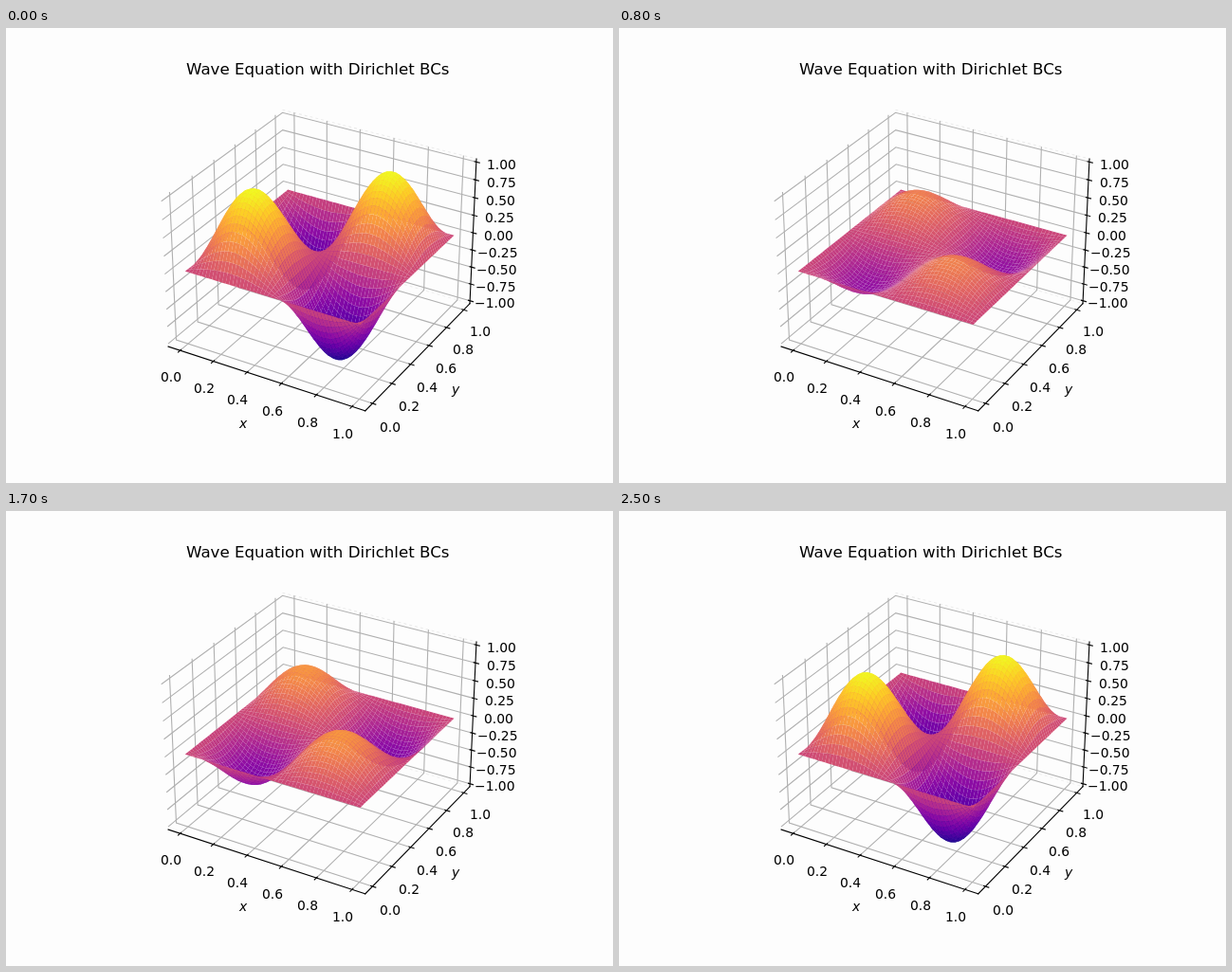
These frames come from a looping animation (640x480 px, 2.6 s). An HTML page with a canvas:

```html
<!DOCTYPE html>
<html lang="en">
<head>
<meta charset="utf-8">
<title>Wave Equation with Dirichlet BCs</title>
<style>
  html, body { margin: 0; width: 100%; height: 100%; overflow: hidden; background: #fdfdfd; }
  canvas { display: block; }
</style>
</head>
<body>
<canvas id="stage" width="640" height="480"></canvas>
<script>
const ctx = document.getElementById('stage').getContext('2d');

const STEP_MS = 100, STEPS = 26, PERIOD = 25.6;
const CELLS = 50;
const FONT = '"DejaVu Sans", Verdana, sans-serif';
const PLASMA = ['0d0887', '41049d', '6a00a8', '8f0da4', 'b12a90', 'cc4778',
  'e16462', 'f2844b', 'fca636', 'fcce25', 'f0f921']
  .map(h => [0, 2, 4].map(i => parseInt(h.slice(i, i + 2), 16)));

// Axes box in centred world units: 4:4:3 aspect with a small margin.
const BOX = 8 / 7, BOX_Z = 6 / 7;
const SIDE = BOX / 2 * 25 / 24, TALL = BOX_Z / 2 * 25 / 24;
const DELTA = BOX / 12, DELTA_Z = BOX_Z / 12;
const wx = v => (v - 0.5) * BOX / 1.1;
const wz = v => v * BOX_Z / 2;

// Perspective camera: elevation 30, azimuth -60, distance 10.
const ELEV = Math.PI / 6, AZIM = -Math.PI / 3, DIST = 10;
const [se, ce, sa, ca] = [Math.sin(ELEV), Math.cos(ELEV), Math.sin(AZIM), Math.cos(AZIM)];
const ZOOM = 369.6 / 0.185;

function project(x, y, z) {
  const near = ce * ca * x + ce * sa * y + se * z;
  const k = ZOOM / (DIST - near);
  return [
    332.995 + k * (-sa * x + ca * y),
    237.405 - k * (-se * ca * x - se * sa * y + ce * z),
    near
  ];
}

function trace(points) {
  ctx.beginPath();
  for (const p of points) ctx.lineTo(p[0], p[1]);
}

function line(color, ...points) {
  trace(points.map(p => project(...p)));
  ctx.strokeStyle = color;
  ctx.lineWidth = 1.111;
  ctx.stroke();
}

// Centres the inked width on x, with y as the baseline.
function text(str, x, y, size = 13.889, style = '') {
  ctx.font = `${style} ${size}px ${FONT}`;
  ctx.fillStyle = '#000';
  const m = ctx.measureText(str);
  const half = (m.actualBoundingBoxRight - m.actualBoundingBoxLeft) / 2;
  ctx.fillText(str, Math.ceil(x - half), y);
}

function tickLabel(str, pos) {
  const [x, y] = project(...pos);
  text(str, x, Math.round(y + 11));
}

function plasma(v) {
  const s = Math.min(1, Math.max(0, v)) * (PLASMA.length - 1);
  const i = Math.min(PLASMA.length - 2, Math.floor(s));
  const rgb = PLASMA[i].map((c, k) => Math.round(c + (PLASMA[i + 1][k] - c) * (s - i)));
  return `rgb(${rgb})`;
}

const flatTicks = [0, 0.2, 0.4, 0.6, 0.8, 1];
const zTicks = Array.from({ length: 9 }, (_, i) => 1 - i / 4);

function drawAxes() {
  const grid = '#b0b0b0', out = 0.2 * DELTA, inn = 0.1 * DELTA;
  const pad = 1.0372 * DELTA, padZ = 1.0372 * DELTA_Z;

  ctx.lineCap = 'butt';
  ctx.setLineDash([3, 3]);
  line('#ececec', [-SIDE, SIDE, TALL], [SIDE, SIDE, TALL]);
  line('#f0f0f0', [-SIDE, SIDE, -TALL], [SIDE, SIDE, -TALL]);
  ctx.setLineDash([]);

  for (const v of flatTicks) {
    const t = wx(v);
    line(grid, [t, -SIDE, -TALL], [t, SIDE, -TALL], [t, SIDE, TALL]);
    line(grid, [SIDE, t, -TALL], [-SIDE, t, -TALL], [-SIDE, t, TALL]);
  }
  for (const v of zTicks) {
    const t = wz(v);
    line(grid, [-SIDE, -SIDE, t], [-SIDE, SIDE, t], [SIDE, SIDE, t]);
  }

  ctx.lineCap = 'square';
  line('#000', [-SIDE, -SIDE, -TALL], [SIDE, -SIDE, -TALL]);
  line('#000', [SIDE, -SIDE, -TALL], [SIDE, SIDE, -TALL]);
  line('#000', [SIDE, SIDE, -TALL], [SIDE, SIDE, TALL]);

  for (const v of flatTicks) {
    const t = wx(v), name = v.toFixed(1);
    line('#000', [t, -SIDE - out, -TALL], [t, -SIDE + inn, -TALL]);
    line('#000', [SIDE + out, t, -TALL], [SIDE - inn, t, -TALL]);
    tickLabel(name, [t, -SIDE - pad, -TALL - padZ]);
    tickLabel(name, [SIDE + pad, t, -TALL - padZ]);
  }
  for (const v of zTicks) {
    const t = wz(v);
    line('#000', [SIDE + out, SIDE, t], [SIDE - inn, SIDE, t]);
    tickLabel(v.toFixed(2).replace('-', '\u2212'), [SIDE + pad, SIDE + pad, t]);
  }

  text('x', 249.6, 422, 13.889, 'italic');
  text('y', 473.8, 386, 13.889, 'italic');
  text('Wave Equation with Dirichlet BCs', 328, 49, 16.667);
}

function drawSurface(amp) {
  const wave = Array.from({ length: CELLS + 1 }, (_, i) => Math.sin(2 * Math.PI * i / CELLS));
  const nodes = wave.map((a, i) => wave.map((b, j) => {
    const u = amp * a * b;
    return [...project(wx(i / CELLS), wx(j / CELLS), wz(u)), u];
  }));

  const faces = [];
  for (let i = 0; i < CELLS; i++) {
    for (let j = 0; j < CELLS; j++) {
      const pts = [nodes[i][j], nodes[i + 1][j], nodes[i + 1][j + 1], nodes[i][j + 1]];
      const mean = k => pts.reduce((sum, p) => sum + p[k], 0) / 4;
      faces.push({ pts, near: mean(2), u: mean(3) });
    }
  }
  faces.sort((a, b) => a.near - b.near);

  for (const f of faces) {
    trace(f.pts);
    ctx.closePath();
    ctx.fillStyle = plasma((f.u + 1) / 2);
    ctx.fill();
  }
}

function draw(step) {
  ctx.fillStyle = '#fdfdfd';
  ctx.fillRect(0, 0, 640, 480);
  drawAxes();
  drawSurface(Math.cos(2 * Math.PI * step / PERIOD));
}

const start = performance.now();
let shown = -1;

function tick() {
  const step = Math.floor((performance.now() - start) / STEP_MS) % STEPS;
  if (step !== shown) draw(shown = step);
  requestAnimationFrame(tick);
}
tick();
</script>
</body>
</html>
```
